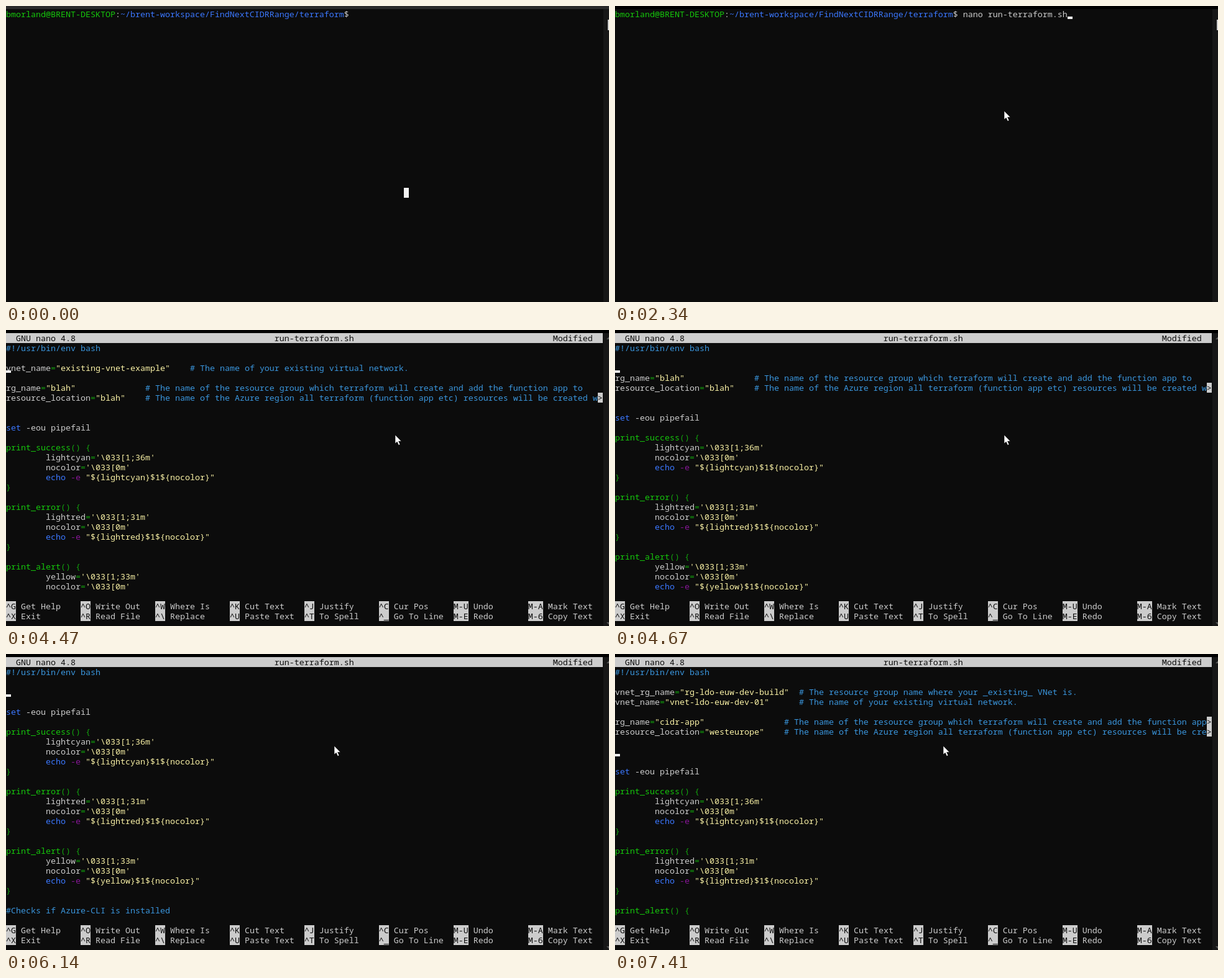
These frames come from a looping animation (970 px wide and 477 px high, 8 s). An HTML page:

```html
<!DOCTYPE html>
<html lang="en">
<head>
<meta charset="utf-8">
<title>Terminal</title>
<style>
html, body { margin: 0; width: 100%; height: 100%; overflow: hidden; background: #0c0c0c; }
#bar, #scroll, #screen, #cursor, #block, #thumb, svg { position: absolute; }
#bar { left: 0; top: 0; width: 970px; height: 5px; }
#scroll { left: 961px; top: 5px; width: 9px; height: 472px; background: #171717; }
#thumb { left: 968px; top: 22px; width: 2px; height: 17px; background: #ccc; }
#screen { left: 0; top: 5px; margin: 0; color: #ccc; font: 13.3333px/16px "Noto Sans Mono", monospace; font-variant-ligatures: none; }
#screen div { height: 16px; }
.inv { display: inline-block; height: 16px; vertical-align: top; background: #ccc; color: #0c0c0c; }
.user, .func { color: #16c60c; }
.path, .word { color: #3b78ff; }
.note { color: #3a96dd; }
.text { color: #f9f1a5; }
.flag { color: #881798; }
.sign { color: #13a10e; }
#cursor { width: 8px; height: 4px; background: #f2f2f2; }
#block { left: 640px; top: 293px; width: 8px; height: 16px; background: #f2f2f2; }
svg { left: 0; top: 0; }
</style>
</head>
<body>
<div id="bar"></div>
<div id="scroll"></div>
<div id="thumb"></div>
<pre id="screen"></pre>
<div id="block"></div>
<div id="cursor"></div>
<svg width="970" height="477">
  <path id="arrows" fill="#5a5a5a" d="M966 15L970 11V15ZM966 471H970V475Z"/>
  <path id="mouse" fill="#fff" stroke="#000" stroke-width=".6" d="M0 0V14L3.2 11.2L5.6 16.6L8 15.6L5.6 10.3H10Z"/>
</svg>
<script>
const LOOP = 8000, OPEN = 2740, COLS = 120;
const $ = id => document.getElementById(id);
const span = (cls, s) => `<span class="${cls}">${s.replace(/</g, '&lt;').replace(/>/g, '&gt;')}</span>`;
const inv = s => span('inv', s);

// Each track lists [time, value]; a value holds until the next time.
const at = (track, t) => track.reduce((v, [from, next]) => t >= from ? next : v, null);

const typed = [[0, ''], [1610, 'n'], [1740, 'na'], [1870, 'nano'], [2070, 'nano '],
  [2140, 'nano r'], [2210, 'nano run'], [2340, 'nano run-terraform.sh ']];
const blink = [[0, false], [740, true], [1270, false], [1610, true]];
const mouse = [[200, [783, 350]], [270, [698, 240]], [340, [626, 169]], [5670, null],
  [6000, [600, 164]], [6070, [555, 153]], [6140, [528, 148]]];
const cut = [[0, 0], [4470, 1], [4670, 2], [4800, 3], [5000, 4], [5330, 5]];
const pasted = [[0, 0], [6210, 3], [6280, 5]];
const cursorRow = [[0, 1], [3340, 2], [3540, 3], [6210, 5], [6280, 7], [6880, 8], [7410, 9]];

const settings = (group, vnet, app, place, gaps) => {
  const line = (key, value, i, note) => `${key}="${value}"${' '.repeat(gaps[i])}# The ${note}`;
  return [
    line('vnet_rg_name', group, 0, 'resource group name where your _existing_ VNet is.'),
    line('vnet_name', vnet, 1, 'name of your existing virtual network.'),
    '',
    line('rg_name', app, 2, 'name of the resource group which terraform will create and add the function app to'),
    line('resource_location', place, 3, 'name of the Azure region all terraform (function app etc) resources will be created within'),
  ];
};
const before = settings('existing-rg-example', 'existing-vnet-example', 'blah', 'blah', [1, 4, 14, 4]);
const after = settings('rg-ldo-euw-dev-build', 'vnet-ldo-euw-dev-01', 'cidr-app', 'westeurope', [2, 6, 16, 4]);

const printer = (name, color, code) => [
  `print_${name}() {`,
  `        ${color}='\\033[1;${code}m'`,
  `        nocolor='\\033[0m'`,
  `        echo -e "\${${color}}$1\${nocolor}"`,
  '}', ''];
const tail = ['', '', 'set -eou pipefail', '',
  ...printer('success', 'lightcyan', 36),
  ...printer('error', 'lightred', 31),
  ...printer('alert', 'yellow', 33),
  '#Checks if Azure-CLI is installed'];

const rules = /(?<note>#.*)|(?<text>".*?"|'.*?')|(?<word>\b(?:echo|set)\b)|(?<flag> -e\b)|(?<func>print_\w+)|(?<sign>[=(){}])/g;
const paint = s => s.replace(rules, (m, ...rest) => {
  const groups = rest[rest.length - 1];
  return span(Object.keys(groups).find(k => groups[k] !== undefined), m);
});
const fit = s => s.length > COLS ? paint(s.slice(0, COLS - 1)) + inv('>') : paint(s);

const help = [
  '^G Get Help,^O Write Out,^W Where Is,^K Cut Text,^J Justify,^C Cur Pos,M-U Undo,M-A Mark Text',
  '^X Exit,^R Read File,^\\ Replace,^U Paste Text,^T To Spell,^_ Go To Line,M-E Redo,M-6 Copy Text',
].map(row => row.split(',').map(item => {
  const n = item.indexOf(' ');
  return inv(item.slice(0, n)) + item.slice(n).padEnd(15 - n);
}).join(''));

function shell(t) {
  const text = at(typed, t);
  const prompt = span('user', 'bmorland@BRENT-DESKTOP') + ':' +
    span('path', '~/brent-workspace/FindNextCIDRRange/terraform') + '$ ';
  return { rows: [prompt + text], col: 69 + text.length, row: 0, cursor: at(blink, t) };
}

function editor(t) {
  const row = at(cursorRow, t), count = at(pasted, t);
  const top = count ? after.slice(0, count) : before.slice(at(cut, t));
  const lines = ['#!/usr/bin/env bash', '', ...top, ...(t >= 7410 ? [''] : []), ...tail];
  const body = Array.from({ length: 25 }, (_, i) => fit(lines[i] || ''));
  let col = 0;
  if (count && t < 6880) {
    const line = lines[row - 1];
    col = line.length;
    // The line under the cursor scrolls sideways by whole pages.
    if (col + 2 >= COLS) {
      const start = col - 6 - (col - 6) % (COLS - 8);
      body[row - 1] = inv('<') + span('note', line.slice(start + 1));
      col -= start;
    }
  }
  const changed = t >= 4470;
  const title = ('  GNU nano 4.8'.padEnd(54) + 'run-terraform.sh').padEnd(110) + (changed ? 'Modified' : '');
  const status = changed ? '' : ' '.repeat(51) + inv('[ Read 79 lines ]');
  return { rows: [inv(title.padEnd(COLS)), ...body, status, ...help], col, row, cursor: true };
}

let shown = '';
function draw(now) {
  const t = now % LOOP;
  const nano = t >= OPEN;
  const view = nano ? editor(t) : shell(t);
  const html = view.rows.map(r => `<div>${r}</div>`).join('');
  if (html !== shown) $('screen').innerHTML = shown = html;

  const show = (id, on) => $(id).style.display = on ? '' : 'none';
  show('cursor', view.cursor);
  $('cursor').style.left = view.col * 8 + 'px';
  $('cursor').style.top = view.row * 16 + 17 + 'px';
  show('block', t < 1610);
  show('thumb', !nano);
  show('arrows', nano);
  $('bar').style.background = t < 740 ? '#2b2b2b' : '#000';

  const spot = at(mouse, t);
  show('mouse', spot);
  if (spot) $('mouse').setAttribute('transform', `translate(${spot})`);
  requestAnimationFrame(draw);
}
draw(0);
</script>
</body>
</html>
```
